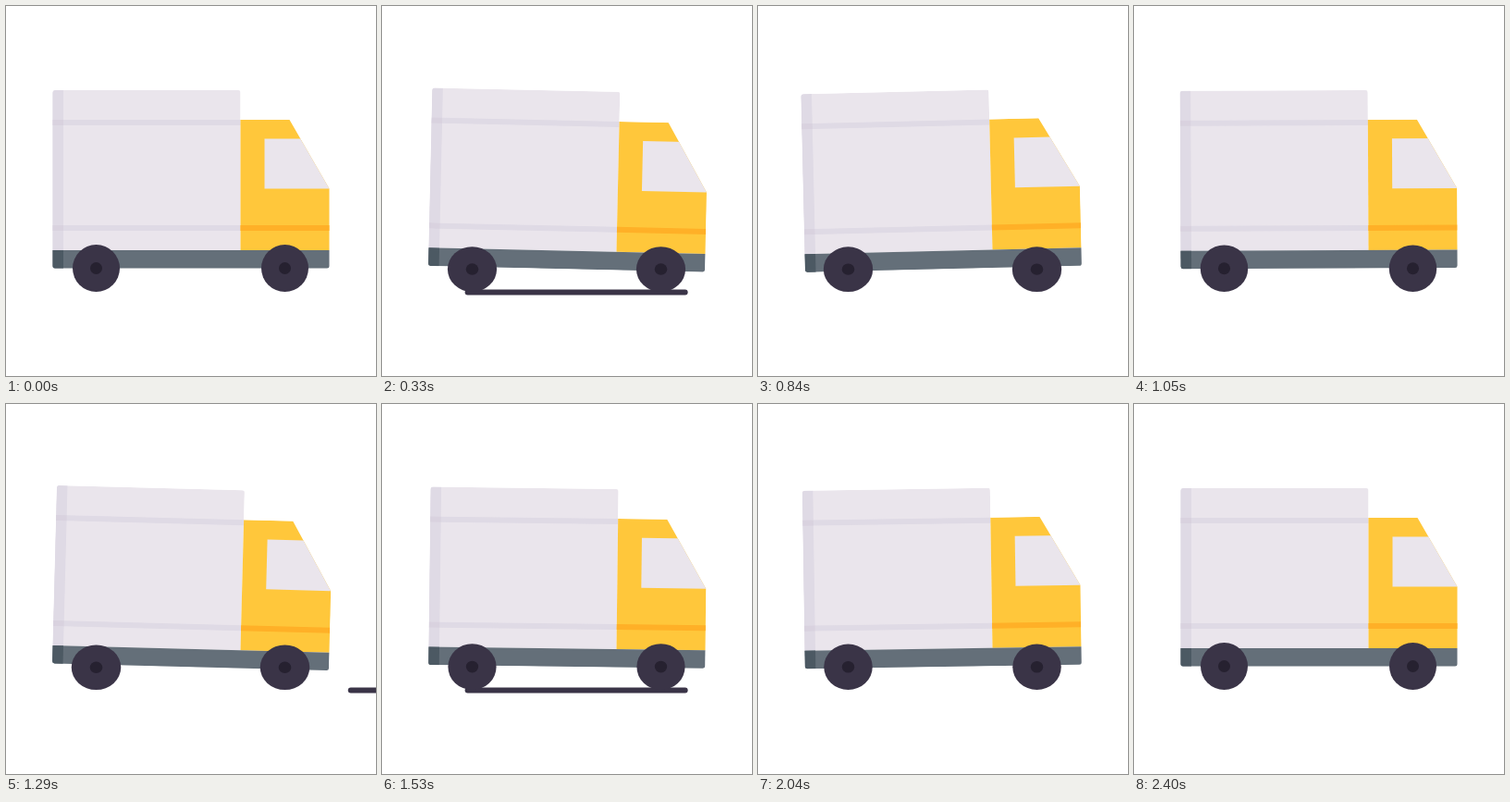
Recreate the animation shown at these times as an HTML page. Size 400 by 400 pixels, loop 4.46 s.

```html
<!DOCTYPE html>
<html lang="en">
<head>
<meta charset="utf-8">
<title>Delivery truck</title>
<style>
  html, body { margin: 0; width: 100%; height: 100%; overflow: hidden; background: #fff; }
  svg { display: block; width: 100%; height: 100%; }
</style>
</head>
<body>
<svg viewBox="0 0 400 400">
  <defs>
    <clipPath id="outline">
      <path d="M50.5 94a3 3 0 0 1 3-3H251a2.5 2.5 0 0 1 2.5 2.5V123H306.500L349.500 197.500V281a2.500 2.500 0 0 1-2.500 2.500H53a2.500 2.500 0 0 1-2.500-2.500Z"/>
    </clipPath>
    <g id="wheel">
      <circle cy="-25.500" r="25.500" fill="#3a3447"/>
      <circle cy="-25.500" r="6.500" fill="#262130"/>
    </g>
  </defs>
  <path id="road" d="M3 309.500H238" stroke="#3a3447" stroke-width="6" stroke-linecap="round"/>
  <g id="body">
    <g clip-path="url(#outline)">
      <path d="M50 90H253.500V264H50Z" fill="#eae5ec"/>
      <path d="M50 90H62V264H50ZM62 123H253.500V129H62ZM62 237H253.500V243H62Z" fill="#dfdae5"/>
      <path d="M50 123H62V129H50ZM50 237H62V243H50Z" fill="#d9d2df"/>
      <path d="M253.500 123H350V264H253.500Z" fill="#ffc73b"/>
      <path d="M279.500 143.500H350V197.500H279.500Z" fill="#eae5ec"/>
      <path d="M253.500 237H350V243H253.500Z" fill="#ffb027"/>
      <path d="M50 264H350V284H50Z" fill="#646f79"/>
      <path d="M50 264H62V284H50Z" fill="#4c5963"/>
    </g>
  </g>
  <use class="wheel" href="#wheel"/>
  <use class="wheel" href="#wheel"/>
</svg>
<script>
const LOOP = 4460, DRIVE = 2400, STEP = 30;
const SWING = 540, SWINGS = 4, PEAK = 150;
const body = document.getElementById('body');
const road = document.getElementById('road');
const wheels = document.querySelectorAll('.wheel');
const wheelX = [97.5, 301.5];

// Lean strength within one swing: quick rise, slow release.
function lean(t) {
  return t < PEAK
    ? 1 - (1 - t / PEAK) ** 2
    : 1 - ((t - PEAK) / (SWING - PEAK)) ** 2.4;
}

function draw(t) {
  const swing = Math.floor(t / SWING);
  const load = swing < SWINGS ? lean(t % SWING) : 0;
  const angle = 1.5 * load * (swing % 2 ? -1 : 1);
  body.setAttribute('transform', `translate(0 ${0.8 * load}) rotate(${angle} 200 264)`);
  wheels.forEach((wheel, i) => wheel.setAttribute('transform',
    `translate(${wheelX[i]} 309) scale(${1 + 0.05 * load} ${1 - 0.05 * load})`));

  // The road dash slows slightly as it passes, twice per drive.
  const s = t < DRIVE ? t % 1200 : 0;
  road.setAttribute('transform', `translate(${488 - 1.354 * s + 0.000445 * s * s} 0)`);
}

const start = performance.now();
function tick() {
  const t = (performance.now() - start) % LOOP;
  draw(Math.floor(t / STEP) * STEP);
  requestAnimationFrame(tick);
}
tick();
</script>
</body>
</html>
```
